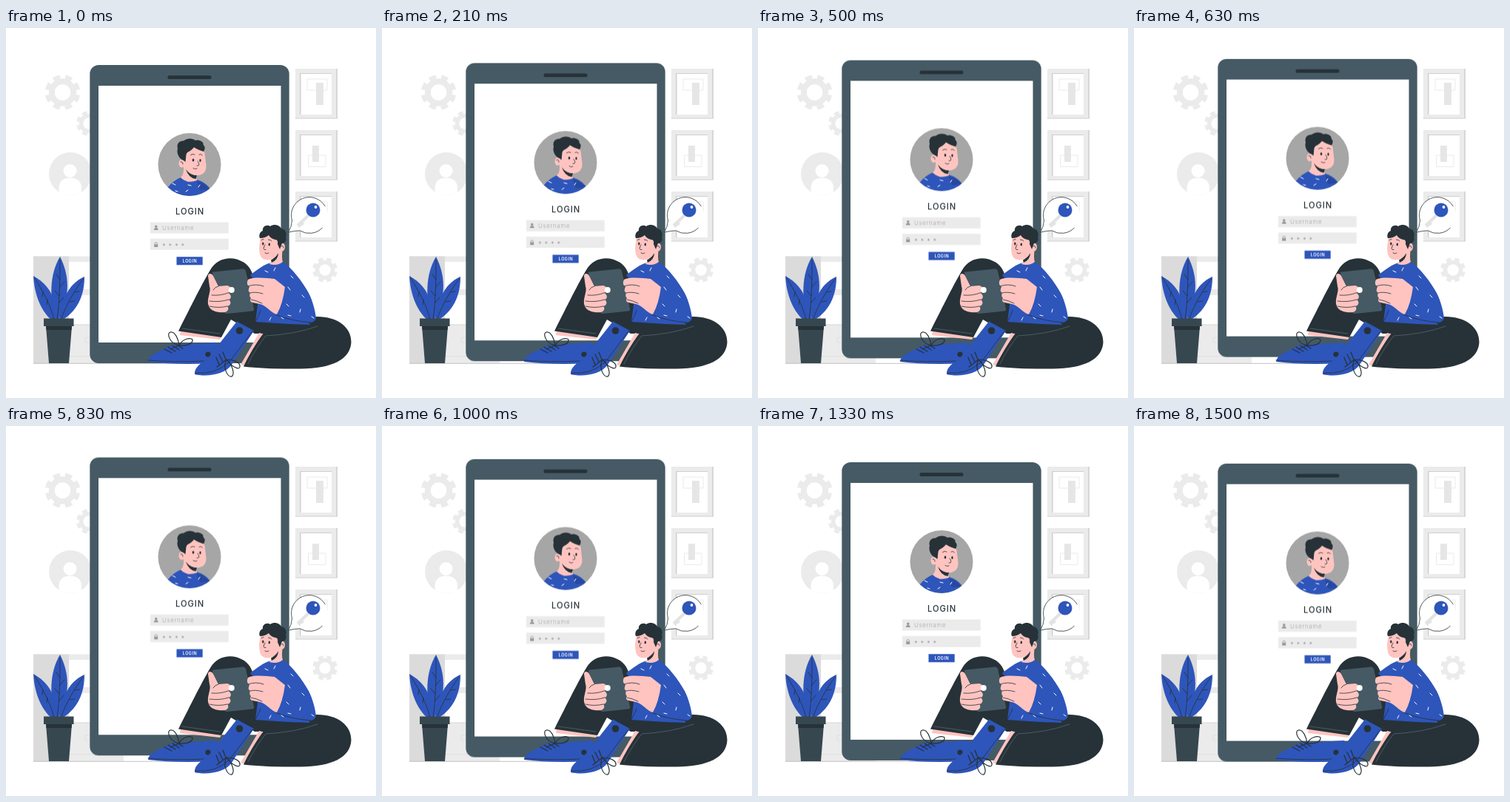
An HTML page for the animation above (1.54 s loop, 500x500 px).

```html
<!DOCTYPE html>
<html lang="en">
<head>
<meta charset="utf-8">
<title>Login</title>
<style>
  html, body { margin: 0; width: 100%; height: 100%; overflow: hidden; background: #fff; }
  svg { display: block; width: 100%; height: 100%; }
  text { font-family: Inter, "Open Sans", sans-serif; }
  .blue { fill: #2e55ba; }
  .dark { fill: #263238; }
  .slate { fill: #455a64; }
  .skin { fill: #ffc4c0; }
  .pale { fill: #ebebeb; }
  .line { fill: none; stroke: #263238; stroke-width: .8; stroke-linecap: round; stroke-linejoin: round; }
  .lace { stroke-width: 1.2; }
  .seam { stroke: #55656d; }
  .ring { fill: none; stroke: #ebebeb; }
  .fleck { fill: none; stroke: #fff; stroke-width: 1; stroke-linecap: round; }
  /* 750 ms up, 750 ms down, then a short rest */
  #phone { animation: float 1540ms linear -44ms infinite; }
  @keyframes float {
    0%, 97.4%, 100% { transform: translateY(.6px); }
    48.7% { transform: translateY(-9.4px); }
  }
</style>
</head>
<body>
<svg viewBox="0 0 500 500">
  <defs>
    <g id="gear" class="ring">
      <circle r="14.800" stroke-width="8"/>
      <circle r="20.800" stroke-width="6" pathLength="16" stroke-dasharray="1.150 .850" transform="rotate(9.500)"/>
    </g>
    <g id="frame">
      <path class="pale" d="M391 55h57v67.500h-57z"/>
      <path fill="#d6d6d6" d="M446 55h2v67.500h-2zM391 121.500h57v1h-57z"/>
      <path fill="#cfcfcf" d="M397 61h43v56h-43z"/>
      <path fill="#fff" d="M398.500 62h41.500v55h-41.500z"/>
    </g>
    <clipPath id="disc"><circle cx="248" cy="184.500" r="42.500"/></clipPath>
    <clipPath id="badge"><circle cx="87" cy="197" r="29"/></clipPath>
  </defs>

  <!-- Wall -->
  <use href="#gear" x="76.500" y="87"/>
  <use href="#gear" transform="translate(112 129) scale(.71)"/>
  <use href="#gear" transform="translate(431 327) scale(.71)"/>
  <circle class="pale" cx="87" cy="197" r="29"/>
  <g fill="#fff" clip-path="url(#badge)">
    <circle cx="86.500" cy="193" r="9"/>
    <path d="M71.500 228V215C72 206 79 202.500 86.500 202.500S101.500 206 102 215V228z"/>
  </g>
  <use href="#frame"/>
  <use href="#frame" y="83"/>
  <use href="#frame" y="166"/>
  <path class="ring" d="M407 69h27v15h-27zM408.500 172h23.500v15.500h-23.500zM407 235h27v15h-27z"/>
  <path fill="#e6e6e6" d="M419 74h10v30h-10zM414 159h9v22h-9z"/>

  <!-- Cabinet -->
  <path class="pale" d="M37 308.500h122v144.500h-122z"/>
  <path fill="#dbdbdb" d="M37 308.500h48v144.500h-48z"/>
  <path fill="#fff" d="M85 316h67v37h-67zM85 361h67v39h-67z"/>
  <path fill="none" stroke="#dedede" stroke-width=".8" d="M85 401.500h67v42h-67M114 418h-7v7h7"/>
  <path stroke="#aaa" stroke-width=".7" d="M37 453.300H260"/>

  <!-- Plant -->
  <g class="blue">
    <path d="M37 335C51 343 62 354 65 371Q67 382 67 394H61C46 381 38 357 37 335z"/>
    <path d="M106 336C106 358 99 380 77 394H72C75 373 81 347 106 336z"/>
    <path d="M73 309C85 332 88 362 71 394H67C59 366 58 334 73 309z"/>
  </g>
  <g class="line" stroke-width=".5">
    <path d="M39 338C49 355 60 373 65 394M50 356L49 363M56 367L55 374"/>
    <path d="M73 313C73 340 73 365 69 394M73 340L68 333M73 350L79 343M72 362L66 355M72 371L78 364"/>
    <path d="M104 339C92 356 82 373 74 394M93 357L99 356M86 370L93 369"/>
  </g>
  <path fill="#37474f" d="M51 392.500h40.500v10.500h-40.500zM54 403h35l-4 50h-27z"/>
  <path class="dark" d="M54 403h35l-.5 5h-34z"/>

  <!-- Phone -->
  <g id="phone">
    <rect class="slate" x="113.300" y="50" width="269.400" height="403" rx="12"/>
    <path fill="#fff" d="M125 78h246.500v347h-246.500z"/>
    <rect class="dark" x="218.500" y="64.300" width="59" height="4.600" rx="2"/>

    <circle cx="248" cy="184.500" r="42.500" fill="#a6a6a6"/>
    <g clip-path="url(#disc)">
      <path class="blue" d="M212 230L219 215Q226 206 236 202L246 208L258 205Q269 208 275 216L285 230z"/>
      <path fill="#2748a0" d="M258 207Q270 210 275 218L262 219z"/>
      <path class="skin" d="M240 176L240 191Q240 199 236 202Q245 211 258 206L255 194z"/>
      <path class="dark" d="M243 191Q249 199 258 199L256.500 204Q247 203 243 191z"/>
      <path class="skin" d="M242 166C253 159 266 161 268.500 169L270.500 186C271 196 264 200 256 199C247 198 242 190 240 180z"/>
      <ellipse class="skin" cx="237.500" cy="183" rx="4" ry="5.500"/>
      <path class="dark" d="M240 179C234 177 230 169 232 163C230 156 235 152 240 152.500C245 148 253 149 256 152C262 150 268 155 266.500 158C270 160 268.500 165 267 167C262 165 258 164 254 161C249 168 245 166 243.500 171L242.500 181z"/>
      <ellipse class="dark" cx="253" cy="178.500" rx="1.300" ry="2"/>
      <ellipse class="dark" cx="262.500" cy="179" rx="1.200" ry="2"/>
      <path class="line" d="M249.500 171.500Q252 169.500 255 171M261 171Q264 169.500 265.500 172M259 180Q262 184 260 186H258M253 189.500Q256 191.500 258 190M236 181Q239 180 239 184"/>
      <path class="fleck" d="M225 210l4 2M246 212l4 1M243 221l3-2M262 212l-2 3M229 220l3 1"/>
    </g>

    <text x="248.600" y="251.600" font-size="11.200" font-weight="500" letter-spacing=".9" text-anchor="middle" class="dark">LOGIN</text>
    <path class="pale" d="M195 262.500h105.700v15h-105.700zM195 284.800h105.700v15h-105.700z"/>
    <g fill="#999">
      <circle cx="202.800" cy="268.300" r="1.700"/>
      <path d="M199.800 273Q200 270 202.800 270T205.800 273zM200.200 292.200h5v3.800h-5z"/>
      <path d="M201 292.500v-1.200a1.700 1.700 0 0 1 3.400 0v1.200" fill="none" stroke="#999" stroke-width=".8"/>
      <text x="211" y="272.800" font-size="8" font-weight="300" letter-spacing=".6" fill="#aaa">Username</text>
      <text x="211.300 219.800 228.300 236.800" y="297.600" font-size="8.500">****</text>
    </g>
    <path class="blue" d="M230.500 309.200h35.200v11h-35.200z"/>
    <text x="248.400" y="316.700" font-size="5.500" font-weight="600" letter-spacing=".45" text-anchor="middle" fill="#fff">LOGIN</text>
  </g>

  <!-- Bubble with key -->
  <circle cx="410" cy="253" r="24.500" fill="#fff"/>
  <path class="line" style="fill:#fff" d="M431.200 240.800A24.500 24.500 0 0 0 386.500 260Q386 269 381.500 276Q390 274 397 273.800A24.500 24.500 0 0 0 427.300 270.300"/>
  <path d="M409 253L394 267M398.500 263l3 3M395.500 266l2.500 2.500" fill="none" stroke="#e3e3e3" stroke-width="4"/>
  <circle class="blue" cx="415" cy="246" r="9.500"/>
  <circle cx="418.500" cy="242" r="1.900" fill="#fff"/>

  <!-- Rear leg and shoe -->
  <path class="skin" d="M236 409L292 416L289 421L235 415z"/>
  <path class="dark" d="M233 409.500C245 386 263 349 276 327C285 310 306 308 318 315C329 320 334 330 336 345L400 400L372 413H336L304 394L291 418z"/>
  <path class="line seam" d="M238 406L289 413"/>
  <path class="blue" d="M192 451C193 442 205 438 213 434Q222 427 234 428L284 425L287 430L270 453.500Q225 455 192 451z"/>
  <path class="line" d="M192 449Q225 452 270 450"/>
  <path class="line lace" d="M214 434l10 5M219 431l10 6M225 429l9 6M231 428l8 5"/>
  <path class="line lace" d="M233 429C220 425 217 412 222 411C229 410 233 421 234 429C238 420 249 418 252 421C253 427 243 430 234 429M234 429L222 434"/>
  <circle class="dark" cx="273" cy="441" r="3.600"/>

  <!-- Front leg and shoe -->
  <path class="skin" d="M342 412L350 414L325 457L317 455z"/>
  <path class="dark" d="M321 457.500C328 443 337 427 349 411C372 410 385 390 420 390C449 390 467 405 466.500 425C465 448 441 460 398 460.500Q350 461 321 457.500z"/>
  <path class="line seam" d="M327 454Q338 432 351 416Q390 414 421 403"/>
  <path class="blue" d="M255 468C254 459 264 452 273 446L312 396.500L335 409L305 455C296 468 272 472 255 468z"/>
  <path class="line" d="M256 466Q283 469 302 451L333 410"/>
  <path class="line lace" d="M284 445l4 10M288 441l5 10M293 438l4 10"/>
  <path class="line lace" d="M298 448C292 460 300 472 305 471C310 467 305 454 298 448C304 457 315 463 316 458C317 451 306 448 298 448M298 448L285 458"/>
  <circle class="dark" cx="315.500" cy="409" r="4.800"/>

  <!-- Torso -->
  <path class="blue" d="M330 334C340 326 348 320 358 317L374 316C387 325 400 342 409 358C415 370 418 383 419 392Q417 398 409 398.500L411 401Q375 400 337 397L343 350z"/>
  <path class="line" d="M376 350Q373 371 365 388M366 388Q386 396 412 398M376 350Q366 343 352 340M337 397Q342 388 344 382"/>
  <path class="fleck" d="M350 328l4 2M364 324l-2 4M385 335l3 3M381 350l3 4M400 361l3 3M379 373l3 3M398 380l-1 4M381 388l4 1M413 390l3 2M358 391l-2 4M372 391l3 2"/>

  <!-- Head -->
  <path class="skin" d="M363 301L374 297Q372 311 374 316Q367 322 356 319L360 312z"/>
  <path class="dark" d="M358 313.500Q365 310 368 304Q368 313 359 317z"/>
  <path class="skin" d="M345 281C341 293 341 305 346 311C353 316 364 313 367 303L374 290L367 277z"/>
  <ellipse class="skin" cx="373" cy="296" rx="4" ry="5.500"/>
  <path class="dark" d="M343 284C341 279 344 275 347 274C346 268 353 265 357 268C363 264 370 267 372 271C378 272 380 278 378 282C380 287 377 291 373 291L370 299L367 292Q368 286 364 286Q358 285 355 280Q350 284 343 284z"/>
  <ellipse class="dark" cx="347.300" cy="291.500" rx="1.200" ry="1.900"/>
  <ellipse class="dark" cx="355.800" cy="292.500" rx="1.200" ry="1.900"/>
  <path class="line" d="M345 286.500l3-1M354.500 286Q358 286 359 288M350 293Q347 298 349 299.500H351M350 304Q353 306 355 304M372 295Q375 293 375 297"/>

  <!-- Tablet and hands -->
  <path class="dark" d="M281 329L323 325Q325 325 326 328L339 379Q339 382 336 383L301 387z"/>
  <path class="slate" d="M279 332Q278 330 281 329.500L320 325.500Q323 325 324 328L335 379Q336 382 333 382.500L299 386Q295 386 294 383z"/>
  <path class="skin" d="M273 335C273 331 278 331 280 335L287 349L299 348C305 349 305 356 300 358C305 360 305 366 301 367C305 370 304 375 299 376C302 379 300 383 296 384C287 385 277 383 274 376C270 367 278 356 275 349z"/>
  <path class="line" d="M287 349Q282 350 280 354M300 358Q290 362 278 361M301 367Q288 371 275 369M299 376Q287 379 275 376"/>
  <circle cx="304.800" cy="354" r="4" fill="#fff"/>
  <path class="skin" d="M327 340C335 336 352 338 363 339L377 350Q374 373 366 387C358 385 352 375 343 373L333 371Q328 369 331 365Q328 362 330 358Q326 355 329 350Q324 346 327 340z"/>
  <path class="line" d="M327 349Q338 345 348 349M330 358Q337 356 347 359M331 367Q338 368 346 372"/>
</svg>
</body>
</html>
```
